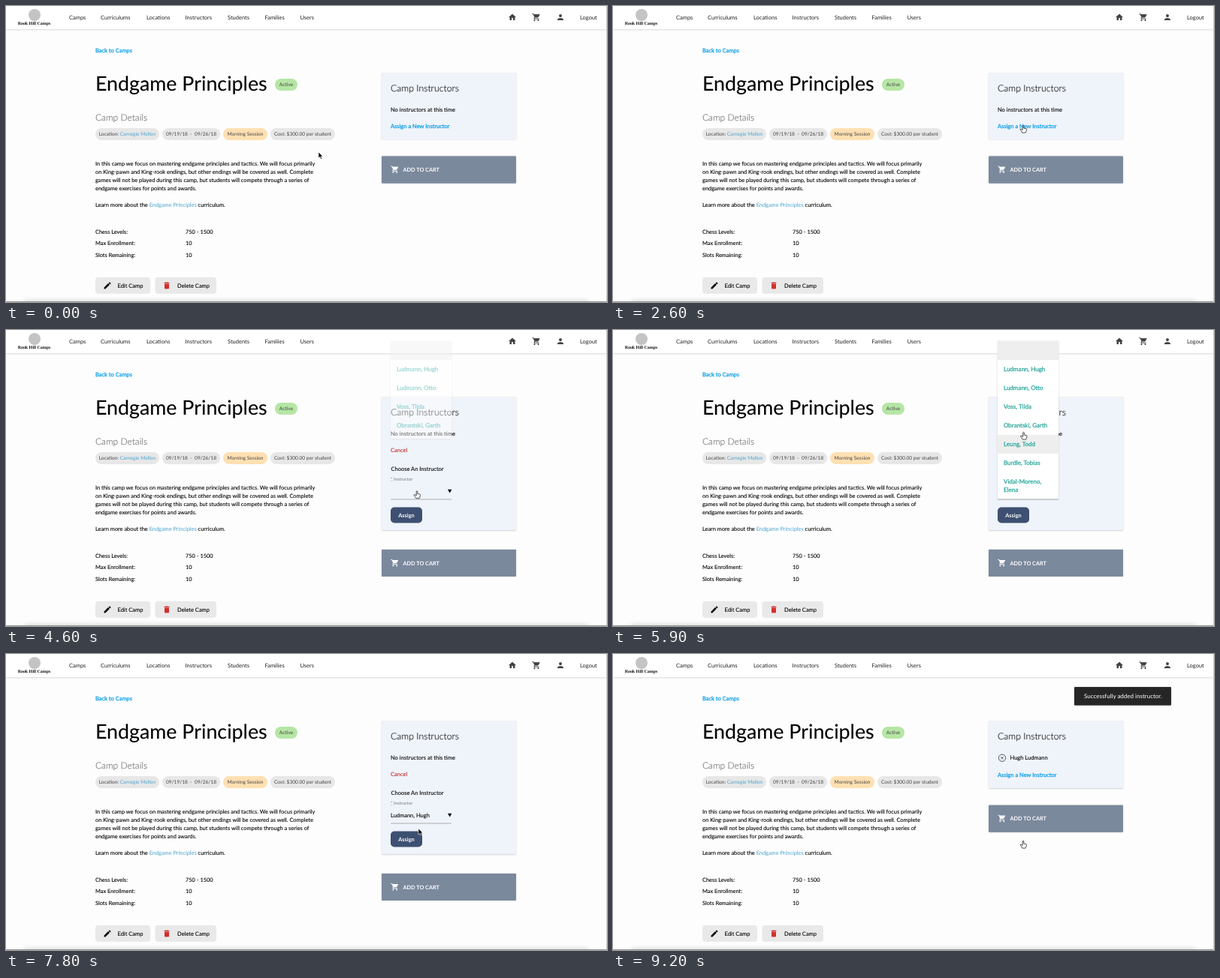
These frames come from a looping animation (800x395 px, 9.3 s). An HTML page:

```html
<!DOCTYPE html>
<html lang="en">
<head>
<meta charset="utf-8">
<title>Camp page</title>
<style>
html, body { margin: 0; width: 100%; height: 100%; overflow: hidden; background: #fdfdfd; }
svg { display: block; width: 800px; height: 395px; font: 7.4px Lato, sans-serif; text-rendering: geometricPrecision; }
text { white-space: pre; fill: #000; stroke: #000; stroke-width: .1; }
.nav text { fill: #222; font-size: 7.5px; stroke: none; }
.nav .brand { font: bold 5.9px "Liberation Serif", serif; fill: #111; }
.light { font-weight: 300; }
.link { fill: #039be5; stroke: #039be5; stroke-width: .25; font-size: 7.5px; }
.soft { fill: #4aa3cf; stroke: none; }
.chips { font-size: 6.6px; text-anchor: middle; }
.chips text { fill: #444; stroke: none; }
.bold { font-weight: 700; fill: #fff; stroke: none; }
.shade { filter: drop-shadow(0 .8px .5px rgba(0, 0, 0, .3)) drop-shadow(0 0 1px rgba(0, 0, 0, .15)); }
.list text { font-size: 8px; fill: #26a69a; stroke: #26a69a; stroke-width: .25; }
</style>
</head>
<body>
<svg viewBox="0 0 800 395">
  <defs>
    <clipPath id="clip"><rect id="clipBox" x="505" y="0" width="95" height="0"/></clipPath>
    <path id="cartIcon" d="M7 18c-1.1 0-2 .9-2 2s.9 2 2 2 2-.9 2-2-.9-2-2-2zM1 2v2h2l3.6 7.6-1.35 2.44c-.16.28-.25.61-.25.96 0 1.1.9 2 2 2h12v-2H7.4c-.14 0-.25-.11-.25-.25l.03-.12.92-1.63h7.45c.75 0 1.41-.41 1.75-1.03l3.58-6.49A1 1 0 0 0 20 4H5.2l-.93-2zM17 18c-1.1 0-2 .9-2 2s.9 2 2 2 2-.9 2-2-.9-2-2-2z"/>
  </defs>

  <g class="nav">
    <rect width="800" height="31.5" fill="#fff" class="shade"/>
    <circle cx="38" cy="12" r="8" fill="#c4c4c4"/>
    <text class="brand" x="37.5" y="25.3" text-anchor="middle">Rook Hill Camps</text>
    <g id="menu"></g>
    <g fill="#444">
      <path transform="translate(668 9) scale(.5)" d="M10 20v-6h4v6h5v-8h3L12 3 2 12h3v8z"/>
      <use href="#cartIcon" transform="translate(700 9) scale(.5)"/>
      <path transform="translate(732 9) scale(.5)" d="M12 12a4 4 0 1 0 0-8 4 4 0 0 0 0 8zm0 2c-2.67 0-8 1.34-8 4v2h16v-2c0-2.66-5.33-4-8-4z"/>
    </g>
  </g>

  <text class="link" x="119" y="62.3">Back to Camps</text>
  <text x="119" y="112.5" font-size="26.8">Endgame Principles</text>
  <text class="light" x="119" y="153" font-size="12" style="fill:#666;stroke:#666">Camp Details</text>
  <g class="chips" id="chips"></g>
  <g id="about"></g>
  <text x="119" y="268">Learn more about the <tspan class="soft">Endgame Principles</tspan> curriculum.</text>

  <rect x="119" y="362" width="73" height="22" rx="4" fill="#e9e9e9"/>
  <rect x="198.5" y="362" width="81.5" height="22" rx="4" fill="#e9e9e9"/>
  <path transform="translate(129 367) scale(.5)" d="M3 17.25V21h3.75L17.8 9.94l-3.75-3.75zM20.7 7.04a1 1 0 0 0 0-1.41l-2.33-2.34a1 1 0 0 0-1.41 0l-1.83 1.83 3.75 3.75z"/>
  <path transform="translate(208 367) scale(.5)" fill="#d32f2f" d="M6 19c0 1.1.9 2 2 2h8c1.1 0 2-.9 2-2V7H6zM19 4h-3.5l-1-1h-5l-1 1H5v2h14z"/>
  <text x="148.5" y="375.6" font-size="7.5">Edit Camp</text>
  <text x="228" y="375.6" font-size="7.5">Delete Camp</text>

  <rect class="shade" id="panel" x="500" y="90" width="179" height="88" rx="1" fill="#eff3fa"/>
  <text class="light" x="512" y="113.9" font-size="12.3" stroke-width=".2">Camp Instructors</text>
  <text id="none" x="512" y="140.6" font-size="7.5">No instructors at this time</text>
  <g id="added">
    <g fill="none" stroke="#333" stroke-width=".8">
      <circle cx="518" cy="138.7" r="4.7"/>
      <path d="M516.3 137l3.4 3.4m0-3.4l-3.4 3.4"/>
    </g>
    <text id="addedName" x="528.5" y="140.5" font-size="7.5"></text>
  </g>
  <text class="link" id="assignLink" x="512" y="162.8">Assign a New Instructor</text>

  <g id="form">
    <text x="512" y="162.8" font-size="7.5" style="fill:#c62828;stroke:#c62828">Cancel</text>
    <text x="512.5" y="187.8" font-size="7.5">Choose An Instructor</text>
    <text x="512" y="200.5" font-size="5.9" style="fill:#777;stroke:none">* Instructor</text>
    <path d="M512 201.5h3" stroke="#999" stroke-width=".5" stroke-dasharray="1 .5"/>
    <text id="choice" x="512" y="217.5" font-size="7.5"></text>
    <path d="M588 212.8h5.4l-2.7 4.7z"/>
    <path d="M512 226h81" stroke="#9e9e9e" stroke-width=".8"/>
    <rect x="512" y="236.5" width="42" height="21" rx="5" fill="#3d5071"/>
    <text class="bold" x="533" y="249.6" text-anchor="middle">Assign</text>
  </g>

  <g id="cart">
    <rect class="shade" x="500" y="200.5" width="179" height="36" rx="1" fill="#7b899d"/>
    <use href="#cartIcon" transform="translate(512 212.5) scale(.48)" fill="#fff"/>
    <text class="bold" x="528.5" y="221" font-size="7.3">ADD TO CART</text>
  </g>

  <rect x="24" y="393" width="752" height="8" fill="#000" opacity=".14" style="filter:blur(3px)"/>
  <path d="M0 394.5h800" stroke="#999"/>
  <path d="M799.5 0v395" stroke="#ccc"/>

  <g id="drop" clip-path="url(#clip)">
    <rect class="shade" id="sheet" x="512" y="15" width="81" fill="#fff"/>
    <rect x="512" y="15" width="81" height="25" fill="#eee"/>
    <rect id="hover" x="512" width="81" fill="#eee"/>
    <g class="list" id="list"></g>
  </g>

  <g id="toast">
    <rect class="shade" x="614" y="44" width="129" height="24.5" rx="1" fill="#262626"/>
    <text x="627" y="59.2" font-size="8" style="fill:#fff;stroke:none">Successfully added instructor.</text>
  </g>

  <path id="arrow" d="M0 0v8l1.9-1.7 1.3 2.9 1.4-.6-1.3-2.8h2.5z" stroke="#fff" stroke-width=".6"/>
  <path id="hand" d="M-.8.8q.8-1.3 1.6 0v3.2l3 .7q.9.3.7 1.3l-.6 2.4-.8 1.7h-4.3l-1.3-2.4-1.6-2q.6-1.2 2-.1l1.3.9z" fill="#fff" stroke="#222" stroke-width=".8"/>
</svg>
<script>
const $ = id => document.getElementById(id);
const text = (x, y, s) => `<text x="${x}" y="${y}">${s}</text>`;
const show = (id, on) => $(id).style.display = on ? '' : 'none';
const set = (id, name, value) => $(id).setAttribute(name, value);
const clamp = v => Math.max(0, Math.min(1, v));
const easeOut = p => 1 - (1 - clamp(p)) ** 3;

const person = { first: 'Hugh', last: 'Ludmann' };
const chosen = `${person.last}, ${person.first}`;
$('addedName').textContent = `${person.first} ${person.last}`;

$('menu').innerHTML = [['Camps', 84], ['Curriculums', 126], ['Locations', 187], ['Instructors', 238.5],
  ['Students', 295], ['Families', 344.5], ['Users', 391.5], ['Logout', 764]]
  .map(([s, x]) => text(x, 17.6, s)).join('');

const grey = '#e7e7e7';
$('chips').innerHTML = [
  [358, 97, 30, '#b5e6a5', 'Active'],
  [119, 163, 85, grey, 'Location: <tspan class="soft">Carnegie Mellon</tspan>'],
  [208, 163, 77, grey, '09/19/18  -  09/26/18'],
  [289, 163, 59, '#ffe0b2', 'Morning Session'],
  [352, 163, 86, grey, 'Cost: $300.00 per student']
].map(([x, y, w, fill, s]) =>
  `<rect x="${x}" y="${y}" width="${w}" height="16" rx="8" fill="${fill}"/>` + text(x + w / 2, y + 10.4, s)).join('');

$('about').innerHTML = [
  'In this camp we focus on mastering endgame principles and tactics. We will focus primarily',
  'on King-pawn and King-rook endings, but other endings will be covered as well. Complete',
  'games will not be played during this camp, but students will compete through a series of',
  'endgame exercises for points and awards.'
].map((s, i) => text(119, 212.5 + i * 11.05, s)).join('') +
  [['Chess Levels:', '750 - 1500'], ['Max Enrollment:', '10'], ['Slots Remaining:', '10']]
    .map(([k, v], i) => text(119, 303.5 + i * 15.6, k) + text(239, 303.5 + i * 15.6, v)).join('');

$('list').innerHTML = [chosen, `${person.last}, Otto`, 'Voss, Tilda', 'Obrantski, Garth', 'Leung, Todd',
  'Burdle, Tobias', 'Vidal-Moreno,'].map((s, i) => text(520, 55.2 + i * 25, s)).join('') + text(520, 216, 'Elena');

// Pointer stops: time, x, y
const stops = [[0, 416, 195], [300, 417, 194], [1000, 490, 177], [1400, 534.5, 166], [1700, 546, 159],
  [2900, 546, 159], [3100, 546, 162], [3500, 546, 162], [4200, 547, 214.5], [5500, 547, 214.5], [5900, 546.5, 136],
  [6500, 546.5, 73], [6800, 546.5, 51], [7300, 546.5, 53], [7500, 547, 110], [7800, 549, 233],
  [8100, 546, 249], [9300, 546, 249]];

function pointer(t) {
  const i = stops.findIndex(s => s[0] > t);
  const [t0, x0, y0] = stops[i - 1], [t1, x1, y1] = stops[i];
  const p = (t - t0) / (t1 - t0);
  return [x0 + (x1 - x0) * p, y0 + (y1 - y0) * p];
}

const OPEN = 3000, LIST = 4538, PICK = 7000, RELOAD = 8700;

function draw(t) {
  const [x, y] = pointer(t);
  const open = t >= OPEN && t < RELOAD, done = t >= RELOAD;
  show('none', !done);
  show('added', done);
  show('assignLink', !open);
  show('form', open);
  set('assignLink', 'y', done ? 163.8 : 162.8);
  set('panel', 'height', open ? 177.5 : done ? 89.5 : 88);
  set('cart', 'transform', `translate(0 ${open ? 92.5 : done ? 1.2 : 0})`);
  $('choice').textContent = t >= PICK ? chosen : '';

  const grow = easeOut((t - LIST) / 225);
  const alpha = Math.sin(clamp((t - LIST) / 215) * Math.PI / 2) * (1 - clamp((t - PICK) / 225));
  const height = 210.5 * grow;
  const row = Math.max(0, Math.min(7, Math.floor((y - 10) / 25)));
  show('drop', alpha > 0);
  set('drop', 'opacity', alpha);
  set('sheet', 'height', height);
  set('clipBox', 'height', 15 + height + (grow > 0 ? 3 : 0));
  set('hover', 'y', 15 + row * 25);
  set('hover', 'height', grow < 1 ? 0 : row === 7 ? 35.5 : 25);

  const rise = easeOut((t - RELOAD) / 300);
  show('toast', rise > 0);
  set('toast', 'opacity', rise);
  set('toast', 'transform', `translate(0 ${17 * (1 - rise)})`);

  const hand = t >= 1600 && t < 3100 || t >= 4200 && t < 7300 || t >= 8000;
  show('hand', hand);
  show('arrow', !hand);
  set(hand ? 'hand' : 'arrow', 'transform', `translate(${x} ${y})`);
}

const start = performance.now();
function tick() {
  const t = (performance.now() - start) % 9300;
  draw(Math.floor(t / 100) * 100); // ten steps a second
  requestAnimationFrame(tick);
}
draw(0);
tick();
</script>
</body>
</html>
```
